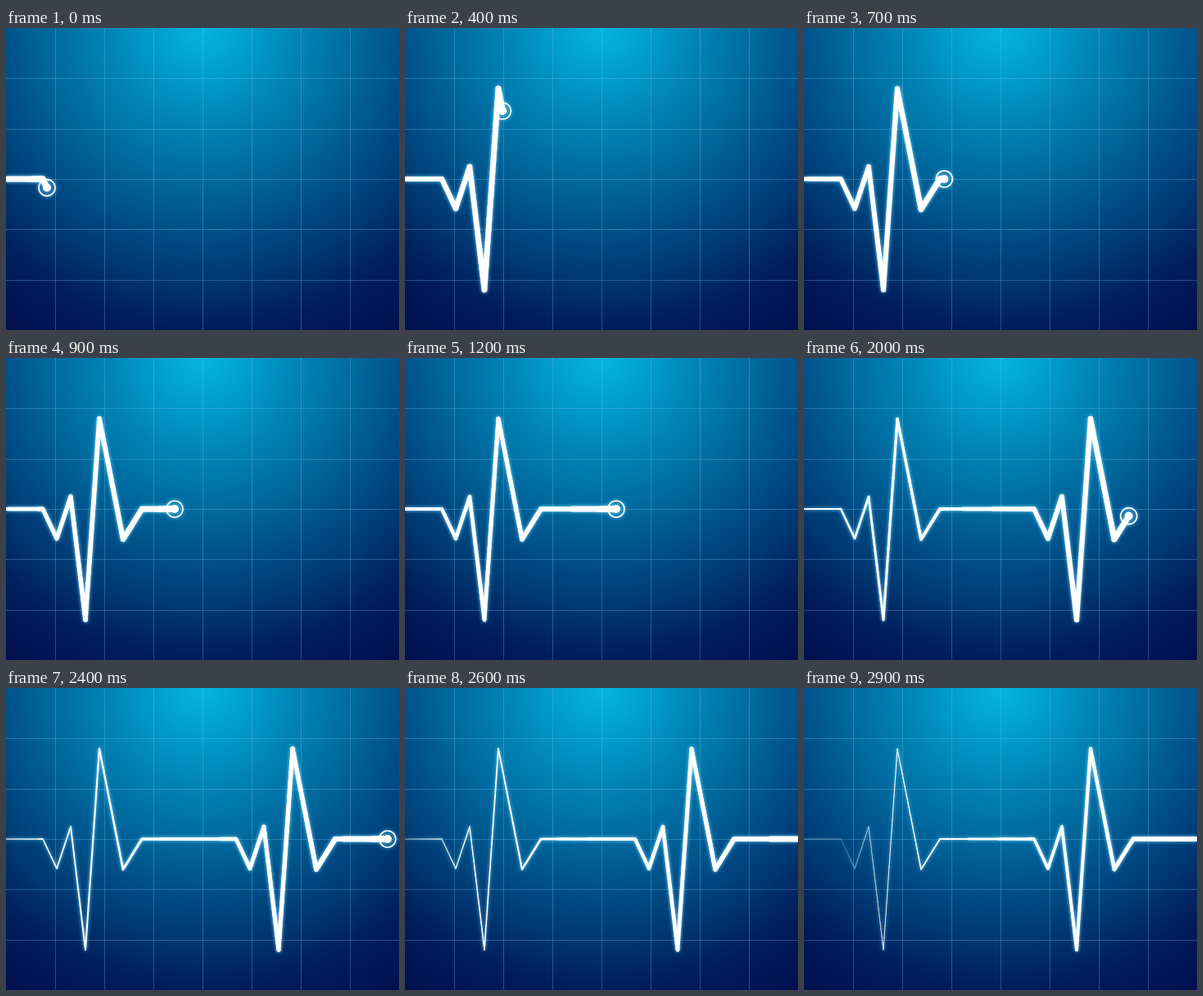
These frames come from a looping animation (480 by 368 pixels, 3000 ms). An HTML page with a canvas:

```html
<!DOCTYPE html>
<html lang="en">
<head>
<meta charset="utf-8">
<title>Heartbeat</title>
<style>
  html, body { margin: 0; width: 100%; height: 100%; overflow: hidden; }
  body {
    background: radial-gradient(circle at 240px 0, #06b5df 0, #009dcb 60px, #0083b4 120px,
      #006a9f 184px, #005089 245px, #003873 305px, #001c5a 368px, #000f4e 440px);
  }
  canvas { position: absolute; left: 0; top: 0; }
  #trace { filter: drop-shadow(0 0 2px #7cdcff); }
</style>
</head>
<body>
<canvas id="grid" width="480" height="368"></canvas>
<canvas id="trace" width="480" height="368"></canvas>
<script>
const LOOP = 3000, STEP = 100, START = 50, TRAVEL = 520, BASE = 184, BEAT = 236;
const beat = [[45, BASE], [62, 220], [79, 169], [97, 319], [114, 74], [143, 221], [166, BASE]];
const points = [[-20, BASE], ...beat, ...beat.map(([x, y]) => [x + BEAT, y]), [600, BASE]];

const grid = document.getElementById('grid').getContext('2d');
grid.fillStyle = 'rgba(120, 205, 235, 0.3)';
for (let i = 1; i < 8; i++) grid.fillRect(i * 60, 0, 1, 368);
for (let i = 1; i < 6; i++) grid.fillRect(0, Math.round(i * 61.35), 480, 1);

const g = document.getElementById('trace').getContext('2d');
g.strokeStyle = g.fillStyle = '#fff';
g.lineCap = 'round';

function heightAt(x) {
  const i = points.findIndex(p => p[0] >= x);
  const [x0, y0] = points[i - 1], [x1, y1] = points[i];
  return y0 + (y1 - y0) * (x - x0) / (x1 - x0);
}

function circle(x, y, r) {
  g.beginPath();
  g.arc(x, y, r, 0, 2 * Math.PI);
}

function draw(head) {
  g.clearRect(0, 0, 480, 368);
  // The line thins steadily with its distance behind the head.
  for (let x = -4; x < Math.min(head, 490); x++) {
    const end = Math.min(x + 1, head);
    g.lineWidth = Math.max(0.2, 7 * (1 - (head - x) / TRAVEL));
    g.beginPath();
    g.moveTo(x, heightAt(x));
    g.lineTo(end, heightAt(end));
    g.stroke();
  }
  const y = heightAt(head);
  circle(head, y, 5);
  g.fill();
  circle(head, y, 10);
  g.lineWidth = 1.6;
  g.stroke();
}

let shown = -1;
function tick() {
  const step = Math.floor(performance.now() % LOOP / STEP);
  if (step !== shown) draw(START + TRAVEL * step * STEP / LOOP);
  shown = step;
  requestAnimationFrame(tick);
}
tick();
</script>
</body>
</html>
```
